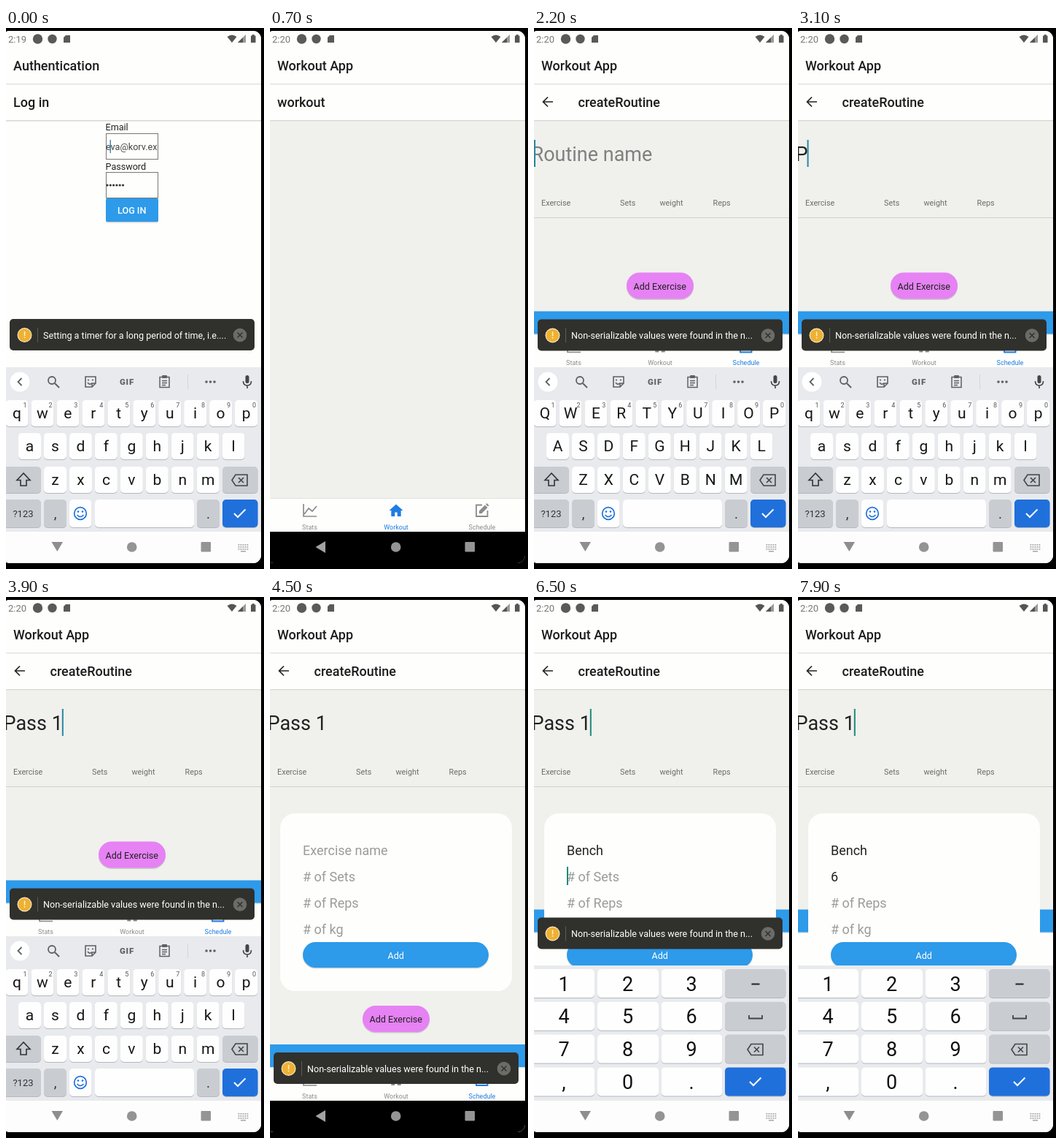
Animation, 354 px wide and 740 px high, one loop 8000 ms. Source, as an HTML page:

```html
<!DOCTYPE html>
<html lang="en">
<head>
<meta charset="utf-8">
<title>Workout app demo</title>
<style>
html, body { margin: 0; width: 100%; height: 100%; overflow: hidden; background: #000; }
svg { display: block; width: 100%; height: 100%; }
text { font-family: Roboto, sans-serif; white-space: pre; }
</style>
</head>
<body>
<svg id="stage" viewBox="0 0 354 740"></svg>
<script>
const LOOP = 8000, STEP = 100;
const WHITE = '#fefefc', BLUE = '#2d9aea', KEY_BLUE = '#2070dc', GRAY_KEY = '#c9ccd1', PAGE = '#f0f0ed';

// Markup helpers
const text = (x, y, s, size, fill = '#222', more = '') =>
  `<text x="${x}" y="${y}" font-size="${size}" fill="${fill}" ${more}>${s}</text>`;
const mid = (x, y, s, size, fill, more = '') => text(x, y, s, size, fill, 'text-anchor="middle" ' + more);
const rect = (x, y, w, h, fill, r = 0, more = '') =>
  `<rect x="${x}" y="${y}" width="${w}" height="${h}" rx="${r}" fill="${fill}" ${more}/>`;
const circle = (x, y, r, fill, more = '') => `<circle cx="${x}" cy="${y}" r="${r}" fill="${fill}" ${more}/>`;
const line = (d, stroke, w = 1.6, more = '') =>
  `<path d="${d}" fill="none" stroke="${stroke}" stroke-width="${w}" ${more}/>`;
const shape = (d, fill) => `<path d="${d}" fill="${fill}"/>`;
const group = (id, body, more = '') => `<g id="${id}" ${more}>${body}</g>`;
const raised = (x, y, w, h, fill, r) => rect(x, y + 1.5, w, h, '#000', r, 'opacity=".16"') + rect(x, y, w, h, fill, r);

function statusBar() {
  return rect(-4, 0, 358, 26, WHITE) + text(3, 19.5, '', 13, '#777', 'id="clock"')
    + circle(43.5, 15, 6.7, '#5a5a5a') + circle(63.5, 15, 6.2, '#5a5a5a')
    + shape('M82 10h6v10h-9v-7z', '#5a5a5a')
    + shape('M303.5 12q6.5-5 13 0l-6.5 8z', '#555')
    + shape('M318 20l11-11v11z', '#999') + shape('M318 20l7-7v7z', '#555')
    + shape('M336 10.5h1.7v-1.5h3v1.5h1.8v9.5h-6.5z', '#555');
}

function headers() {
  return rect(-4, 26, 358, 100, WHITE)
    + rect(-4, 76, 358, 1, '#e0e0de') + rect(-4, 77, 358, 1, '#f3f3f1')
    + rect(-4, 126, 358, 1, '#d6d6d4') + rect(-4, 127, 358, 1, '#e8e8e5')
    + text(10, 58, '', 18, '#1c1c1e', 'font-weight="500" id="appTitle"')
    + text(10, 108, '', 18, '#1c1c1e', 'font-weight="500" id="pageTitle"')
    + group('back', line('M26 101H13M19 94.5L12.5 101L19 107.5', '#222', 1.7));
}

function login() {
  const field = y => rect(137.5, y + .5, 71, 35, 'none', 0, 'stroke="#777"');
  let dots = '';
  for (let i = 0; i < 6; i++) dots += circle(139 + i * 4.3, 215, 1.6, '#333');
  return rect(-4, 126, 358, 563, WHITE)
    + text(136.5, 140, 'Email', 12.6) + field(144)
    + text(137, 167, 'eva@korv.ex', 12.6, '#444') + rect(142.5, 153, 1.5, 18, '#4b88a8', 0, 'id="loginCaret"')
    + text(136.5, 193.5, 'Password', 12.6) + field(197) + dots
    + raised(137, 233, 72, 32, BLUE, 2)
    + mid(172.7, 254, 'LOG IN', 12.6, '#fff', 'font-weight="500"');
}

function tabBar() {
  const chart = line('M46 651V668H64M47 665L53 657L58 661L64 654', 'currentColor', 1.7);
  const home = shape('M173 651.5l9.5 8.5h-2.8v8h-5v-5.5h-3.4v5.5h-5v-8h-2.8z', 'currentColor');
  const edit = line('M291 652.5H283V668H298.500V660', 'currentColor', 1.8)
    + shape('M287 664v-3.500l8-8l3.500 3.500l-8 8zM296 651.500l1.500-1.500l3 3l-1.500 1.500z', 'currentColor');
  const tab = (id, x, label, icon) => group(id, icon + mid(x, 685.5, label, 9, 'currentColor'));
  return rect(-4, 643, 358, 1, '#e2e2df') + rect(-4, 644, 358, 45, WHITE)
    + tab('stats', 54.5, 'Stats', chart) + tab('workout', 173, 'Workout', home) + tab('schedule', 291, 'Schedule', edit);
}

function routine() {
  const heads = [[10, 'Exercise'], [118, 'Sets'], [172.5, 'weight'], [245.5, 'Reps']];
  return text(-3.5, 182, '', 27, '#222', 'id="routineName"')
    + rect(0, 153, 2, 37, '#2a8a8a', 0, 'id="nameCaret"')
    + heads.map(([x, s]) => text(x, 242.5, s, 10.8, '#6c6c6c')).join('')
    + rect(-4, 259, 358, 1, '#cfcfcc');
}

function routineFooter() {
  return raised(127, 559, 92, 36, '#e682f4', 18) + mid(172.8, 582, 'Add Exercise', 12.6, '#222')
    + rect(-4, 612, 358, 32, BLUE);
}

function card() {
  const row = (y, s, id = '') => text(45, y, s, 18, '#9b9b9b', id);
  return rect(14, 296, 318, 243, WHITE, 20)
    + row(352.5, '', 'id="exercise"') + row(388.5, '', 'id="sets"')
    + row(424.5, '# of Reps') + row(460.5, '# of kg')
    + rect(45, 369, 2, 25, '#1d8a78', 0, 'id="setsCaret"')
    + raised(45, 472, 255, 35, BLUE, 17.5) + mid(172.7, 494.5, 'Add', 12.6, '#fff');
}

function toast() {
  return rect(5, 623, 336, 43, '#30302d', 5)
    + circle(25.5, 645, 10, '#f5e6c4') + circle(25.5, 645, 8.8, '#eeb132')
    + rect(24.8, 640, 1.5, 6, '#fff3d0') + rect(24.8, 647.5, 1.5, 1.6, '#fff3d0')
    + rect(43, 635, 1, 20, '#5b5b58') + text(51, 649.5, '', 12.6, '#fff', 'id="message"')
    + circle(321, 645, 9.3, '#6b6b68') + line('M317.500 641.500l7 7m0-7l-7 7', '#2f2f2c', 1.4);
}

const key = (x, y, w, h, fill = '#fefefe') => rect(x, y + 1, w, h, '#b5b8bc', 5) + rect(x, y, w, h, fill, 5);
const erase = (x, y) => line(`M${x - 11} ${y}l5-7.500h16v15h-16zM${x - 2} ${y - 3.500}l7 7m0-7l-7 7`, '#444', 1.6);
const check = (x, y) => line(`M${x - 8} ${y}l5 5l10.500-10.500`, '#fff', 2);

function toolbar() {
  const ink = '#5d6064';
  let dots = '';
  for (let i = -1; i < 2; i++) dots += circle(280.5 + i * 5.5, 484, 1.8, ink);
  return circle(19, 484, 13.5, '#fff') + line('M21.500 479l-5 5l5 5', ink, 1.8)
    + circle(63, 482, 5, 'none', `stroke="${ink}" stroke-width="1.8"`) + line('M67 486l6 6', ink, 2)
    + line('M109 477h14v9l-5 5h-9zM123 486h-5v5M112 485q3 4 5 1', ink)
    + circle(113, 481.5, 1.1, ink) + circle(119, 481.5, 1.1, ink)
    + mid(166, 488, 'GIF', 11.5, ink, 'font-weight="900" letter-spacing=".8"')
    + line('M211 477.500h13v14h-13zM214 482.500h7M214 485.500h7M214 488.500h5', ink, 1.5) + rect(214, 475, 7, 4, ink, 1)
    + rect(249, 474, 1, 20, '#d3d5d8') + dots
    + rect(328.5, 475, 5, 11, '#444', 2.5) + line('M325.500 483q0 6 5.500 6t5.500-6M331 489v4', '#444');
}

function letters() {
  const rows = [['qwertyuiop', 15, 509], ['asdfghjkl', 32.5, 554], ['zxcvbnm', 67.5, 600]];
  let out = rect(-4, 464, 358, 226, '#e8eaed') + toolbar();
  rows.forEach(([chars, x0, y], r) => [...chars].forEach((c, i) => {
    const x = x0 + i * 34.95;
    out += key(x - 15.5, y, 31, 36) + mid(x, y + 24.5, c, 21, '#161616', 'class="letter"');
    if (!r) out += mid(x + 11, y + 10, (i + 1) % 10, 9, '#555');
  }));
  return out
    + key(-4, 600, 52, 36, GRAY_KEY) + line('M24 609l-9 9.500h5v7.500h8v-7.500h5z', '#333', 1.6)
    + key(297, 600, 48.5, 36, GRAY_KEY) + erase(321, 618.5)
    + key(-4, 645, 52, 38, GRAY_KEY) + mid(23.5, 669, '?123', 13, '#333')
    + key(52, 645, 31, 38, GRAY_KEY) + mid(67.500, 671, ',', 19, '#333')
    + key(87, 645, 30.5, 38) + circle(102, 664, 8.3, 'none', `stroke="${KEY_BLUE}" stroke-width="1.7"`)
    + circle(99, 661.5, 1.3, KEY_BLUE) + circle(105, 661.5, 1.3, KEY_BLUE) + line('M97.500 666q4.500 5 9 0', KEY_BLUE)
    + key(122, 645, 136, 38)
    + key(262, 645, 31, 38, GRAY_KEY) + mid(277.5, 671, '.', 19, '#333')
    + key(297, 645, 48.5, 38, KEY_BLUE) + check(321, 664);
}

function numberPad() {
  const rows = ['123', '456', '789', ',0.'];
  let out = rect(-4, 504, 358, 186, '#e8eaed');
  rows.forEach((chars, r) => {
    const y = 509 + r * 44.8;
    [...chars].forEach((c, i) => {
      const x = i ? i * 87.5 - .5 : -4;
      out += key(x, y, i ? 84 : 87, 39) + mid(41 + i * 87.5, y + 29.5, c, 27, '#111');
    });
    out += key(262, y, 83.500, 39, r < 3 ? GRAY_KEY : KEY_BLUE);
  });
  return out + rect(298.5, 528.5, 11, 2, '#222') + line('M295 572v4.500h18V572', '#444', 1.8)
    + erase(304, 619) + check(304, 663);
}

function navBar() {
  const ink = '#8e8e8e';
  let keys = '';
  for (let i = 0; i < 15; i++) keys += rect(318.5 + i % 5 * 3, 706 + Math.floor(i / 5) * 3, 1.8, 1.8, '#aaa');
  return rect(-4, 689, 358, 50, '#000', 0, 'id="navBack"')
    + group('navDown', shape('M62.500 703h15.500l-7.700 13z', ink) + keys + rect(322, 715, 7, 1.6, '#aaa'))
    + group('navLeft', shape('M76 702v16l-13.500-8z', '#a2a2a2'))
    + circle(172.7, 710, 6.8, '#949494') + rect(267.5, 703, 13.5, 13.5, '#949494', 1);
}

stage.innerHTML = `<clipPath id="screen">${rect(-6, 4, 356, 728, '#fff', 11)}</clipPath>`
  + group('phone',
    rect(-4, 0, 358, 740, PAGE)
    + group('routine', routine())
    + group('lower', group('footer', routineFooter()) + tabBar())
    + group('card', card())
    + group('login', login())
    + group('toast', toast())
    + group('letters', letters()) + group('pad', numberPad())
    + statusBar() + headers() + navBar(), 'clip-path="url(#screen)"');

// Each track lists [start time, value]; a value holds until the next entry.
const tracks = {
  clock: [[0, '2:19'], [500, '2:20']],
  login: [[0, 1], [500, .6], [600, .2], [700, 0]],
  loginCaret: [[0, 1], [100, 0]],
  page: [[0, 'Log in'], [600, 'workout'], [1000, 'schedule'], [1400, 'createRoutine']],
  tab: [[0, 'workout'], [1000, 'schedule']],
  routine: [[0, 0], [1400, .35], [1500, .75], [1600, 1]],
  toast: [[0, 'Setting a timer for a long period of time, i.e....'], [500, ''],
    [1800, 'Non-serializable values were found in the n...'], [7500, '']],
  drop: [[0, 0], [200, 60], [300, 170], [400, 230], [1900, 150], [2000, 50], [2100, 12], [2200, 0],
    [4100, 60], [4200, 170], [4300, 230], [5600, 150], [5700, 50], [5800, 0]],
  lift: [[0, 225], [200, 0], [2000, 224.5], [4100, 0], [5700, 224.5], [6400, 184.5]],
  lightNav: [[0, 1], [400, 0], [1900, 1], [4300, 0], [5600, 1]],
  upper: [[0, 0], [1900, 1], [3000, 0], [5600, 1], [6000, 0]],
  pad: [[0, 0], [6400, 1]],
  name: [[0, ''], [3000, 'P'], [3300, 'Pa'], [3400, 'Pas'], [3500, 'Pass'], [3700, 'Pass '], [3900, 'Pass 1']],
  nameCaret: [[0, 0], [2100, 1], [2500, 0], [2900, 1], [4100, 0], [5800, 1], [6700, 0], [7200, 1]],
  card: [[0, 0], [4400, .5], [4500, 1]],
  exercise: [[0, ''], [6000, 'B'], [6100, 'Be'], [6200, 'Ben'], [6300, 'Bench']],
  sets: [[0, ''], [7000, '6']],
  setsCaret: [[0, 0], [6400, 1], [6800, 0], [7000, 1], [7900, 0]]
};

const $ = id => document.getElementById(id);
const fade = (id, value) => $(id).setAttribute('opacity', +value);
const shift = (id, y) => $(id).setAttribute('transform', `translate(0 ${y})`);
const fill = (id, value, hint, hintColor) => {
  $(id).textContent = value || hint;
  $(id).setAttribute('fill', value ? '#222' : hintColor);
};
const letterKeys = [...document.querySelectorAll('.letter')];

function render(time) {
  const s = {};
  for (const name in tracks) s[name] = tracks[name].findLast(([start]) => start <= time)[1];
  const inApp = s.page !== 'Log in', creating = s.page === 'createRoutine';

  $('clock').textContent = s.clock;
  $('appTitle').textContent = inApp ? 'Workout App' : 'Authentication';
  $('pageTitle').textContent = s.page;
  $('pageTitle').setAttribute('x', creating ? 60.5 : 10);
  fade('back', creating);

  fade('login', s.login);
  fade('loginCaret', s.loginCaret);
  fade('routine', s.routine);
  fade('footer', s.routine);
  for (const id of ['stats', 'workout', 'schedule']) $(id).style.color = id === s.tab ? '#1f7ce4' : '#8b8b8b';
  shift('lower', -s.lift);
  shift('toast', -s.lift);
  fade('toast', !!s.toast);
  $('message').textContent = s.toast;

  fill('routineName', s.name, 'Routine name', '#808080');
  const caretX = s.name ? $('routineName').getComputedTextLength() - 4.5 : 0;
  $('nameCaret').setAttribute('x', caretX);
  $('nameCaret').setAttribute('fill', time < 5000 ? '#2b87a0' : '#1d8a78');
  fade('nameCaret', s.nameCaret);

  fade('card', s.card);
  fill('exercise', s.exercise, 'Exercise name', '#9b9b9b');
  fill('sets', s.sets, '# of Sets', '#9b9b9b');
  $('setsCaret').setAttribute('x', s.sets ? 55 : 45);
  fade('setsCaret', s.setsCaret);

  fade('letters', !s.pad);
  fade('pad', s.pad);
  shift('letters', s.drop);
  for (const k of letterKeys) k.textContent = s.upper ? k.textContent.toUpperCase() : k.textContent.toLowerCase();
  $('navBack').setAttribute('fill', s.lightNav ? '#fdfdfd' : '#000');
  fade('navDown', s.lightNav);
  fade('navLeft', !s.lightNav);
}

const begin = performance.now();
let shown = -1;
function tick() {
  const time = Math.floor((performance.now() - begin) % LOOP / STEP) * STEP;
  if (time !== shown) render(shown = time);
  requestAnimationFrame(tick);
}
tick();
</script>
</body>
</html>
```
